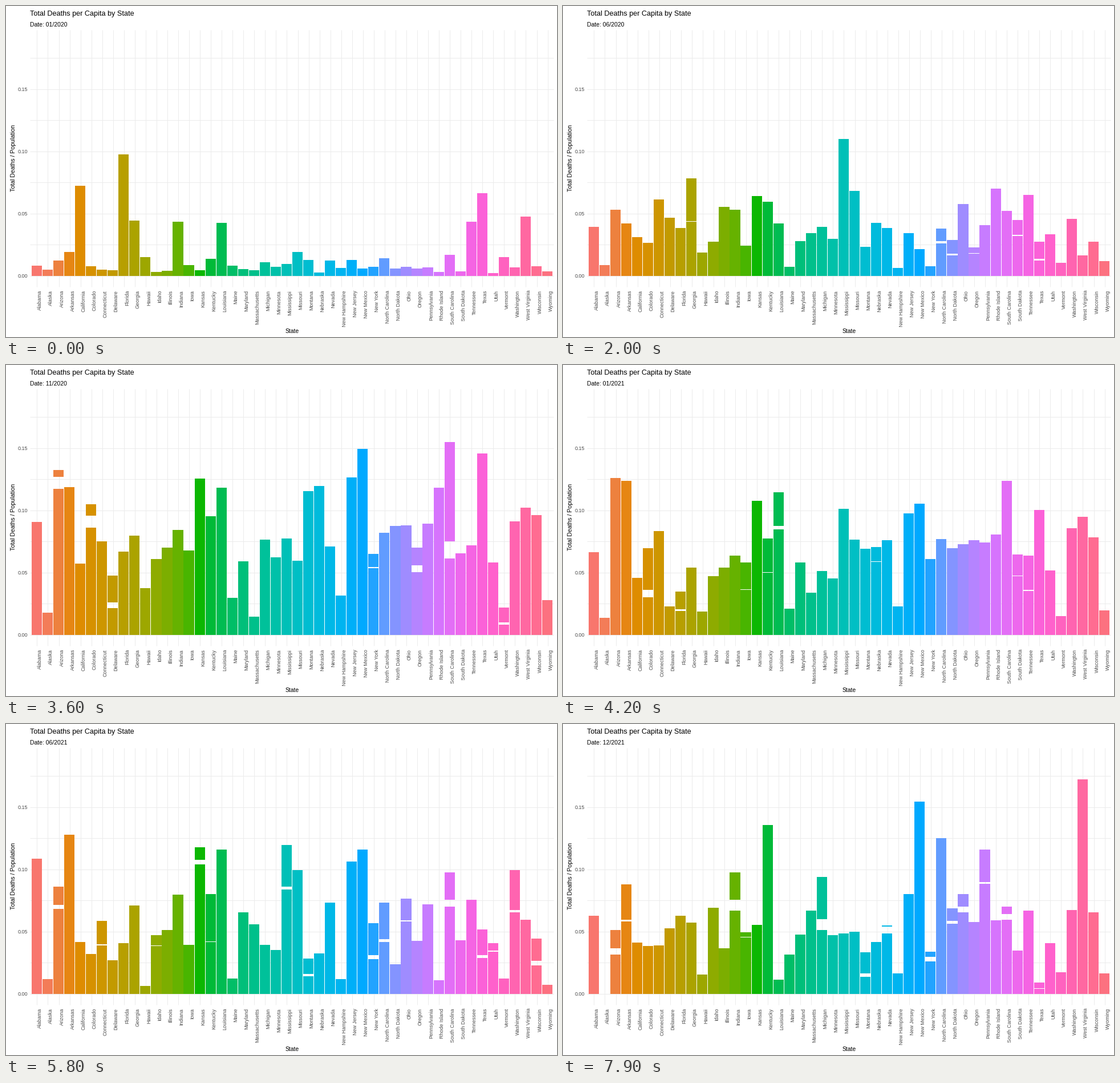
Animation, 966 px wide and 580 px high, one loop 8 s. Source, as a matplotlib script:

```python
import numpy as np
import matplotlib.pyplot as plt
from matplotlib.animation import FuncAnimation

W, H, FRAMES, STEP = 966, 580, 80, 100
LEFT, RIGHT, TOP, BOTTOM = 42, 960, 42, 492
ZERO, SCALE = 472, 2.182          # baseline row, pixels per 0.001
DAYS_PER_FRAME = 9

STATES = """Alabama,Alaska,Arizona,Arkansas,California,Colorado,Connecticut,Delaware,
Florida,Georgia,Hawaii,Idaho,Illinois,Indiana,Iowa,Kansas,Kentucky,Louisiana,Maine,
Maryland,Massachusetts,Michigan,Minnesota,Mississippi,Missouri,Montana,Nebraska,Nevada,
New Hampshire,New Jersey,New Mexico,New York,North Carolina,North Dakota,Ohio,Oregon,
Pennsylvania,Rhode Island,South Carolina,South Dakota,Tennessee,Texas,Utah,Vermont,
Washington,West Virginia,Wisconsin,Wyoming""".replace("\n", "").split(",")
N = len(STATES)

HARD_HIT = """Alabama,Arizona,Arkansas,Georgia,Indiana,Kansas,Kentucky,Louisiana,
Mississippi,Missouri,Nevada,New Jersey,New Mexico,North Carolina,Ohio,Pennsylvania,
South Carolina,Tennessee,Washington,West Virginia""".replace("\n", "").split(",")
SPARED = ["Alaska", "Hawaii", "Maine", "New Hampshire", "Vermont", "Wyoming"]
TIER = np.array([0 if s in HARD_HIT else 2 if s in SPARED else 1 for s in STATES])

# (time, typical height per tier, spread, outliers); heights in thousandths
POSES = [
    (0, (14, 7, 12), .7, {"California": 72, "Florida": 97, "Texas": 66, "Tennessee": 43,
                          "Louisiana": 42, "West Virginia": 47}),
    (12, (29, 22, 10), .4, {"Mississippi": 117, "Rhode Island": 78, "Delaware": 73,
                            "Connecticut": 71, "Illinois": 71}),
    (29, (74, 38, 7), .25, {"Mississippi": 110, "Missouri": 107, "Tennessee": 98,
                            "New York": 0, "New Mexico": 1, "West Virginia": 16}),
    (36, (90, 74, 25), .25, {"New Mexico": 149, "Arizona": 132, "Kansas": 125,
                             "Montana": 115, "Nebraska": 119, "Massachusetts": 14}),
    (49, (68, 36, 7), .25, {"Mississippi": 95, "Missouri": 88, "Nebraska": .5,
                            "Montana": 3, "Delaware": 1.4, "Connecticut": 77}),
    (66, (104, 46, 12), .25, {"Alabama": 164, "Louisiana": 147, "South Carolina": 134,
                              "North Dakota": 0, "Rhode Island": 1.4}),
    (79, (68, 50, 24), .3, {"West Virginia": 172, "New Mexico": 154, "Kentucky": 135,
                            "Louisiana": 11, "Texas": 8.5, "Alaska": 0}),
]


def pose_heights(levels, spread, outliers, rng):
    height = np.take(levels, TIER) * np.exp(rng.normal(0, spread, N))
    for name, value in outliers.items():
        height[STATES.index(name)] = value
    return np.minimum(height, 187)


def build_track(rng):
    """Knots of time, height, gap centre and gap width; gaps are shares of the height."""
    times = [p[0] for p in POSES]
    poses = [pose_heights(*p[1:], rng) for p in POSES]
    knots = [(times[0], poses[0])]
    for t0, t1, a, b in zip(times, times[1:], poses, poses[1:]):
        parts = round((t1 - t0) / 3.4)
        for u in np.arange(1, parts) / parts:
            mid = (a + (b - a) * u) * (1 + rng.normal(0, .15, N))
            knots.append((t0 + (t1 - t0) * u, np.clip(mid, 0, 187)))
        knots.append((t1, b))
    t, height = (np.array(col) for col in zip(*knots))
    centre = rng.uniform(.4, .95, height.shape)
    torn = rng.random(height.shape) < .004 * t[:, None]
    width = rng.uniform(.01, .12, height.shape) * torn
    return t, height, centre, width


TIMES, *TRACKS = build_track(np.random.default_rng(5))


def hcl(hue, chroma=100, lum=65):
    """Polar LUV to sRGB with a D65 white point."""
    white = np.array([.95047, 1, 1.08883])
    s = white @ [1, 15, 3]
    un, vn = 4 * white[0] / s, 9 * white[1] / s
    y = ((lum + 16) / 116) ** 3
    u = chroma * np.cos(np.radians(hue)) / (13 * lum) + un
    v = chroma * np.sin(np.radians(hue)) / (13 * lum) + vn
    x = 9 * y * u / (4 * v)
    z = -x / 3 - 5 * y + 3 * y / v
    rgb = np.array([[3.240479, -1.53715, -.498535],
                    [-.969256, 1.875992, .041556],
                    [.055648, -.204043, 1.057311]]) @ [x, y, z]
    rgb = np.clip(rgb, 0, 1)
    return np.where(rgb > .00304, 1.055 * rgb ** (1 / 2.4) - .055, 12.92 * rgb)


plt.rcParams["font.family"] = "Liberation Sans"
fig = plt.figure(figsize=(W / 100, H / 100), dpi=100, facecolor="white")
ax = fig.add_axes([0, 0, 1, 1])
ax.set(xlim=(0, W), ylim=(H, 0))
ax.axis("off")


def label(x, y, text, px, color="black", ha="left", angle=0):
    return ax.text(x, y, text, fontsize=px * .72, color=color, ha=ha, va="baseline",
                   rotation=angle, rotation_mode="anchor")


pitch = (RIGHT - LEFT) / (N + .2)
xs = LEFT + pitch * (.6 + np.arange(N))

grid = dict(colors="#EBEBEB", linewidth=.72, zorder=1)
rows = np.floor(ZERO - 25 * SCALE * np.arange(8) + .3) + .5
ax.hlines(rows, LEFT, RIGHT, **grid)
ax.vlines(np.round(xs) + .5, TOP, BOTTOM, **grid)

label(42, 16.5, "Total Deaths per Capita by State", 12.6)
date = label(42, 36, "", 10.4)
label(501.5, 573, "State", 10.4, ha="center")
label(15.7, 266.5, "Total Deaths / Population", 10.5, ha="center", angle=90)
for k in range(4):
    label(38, rows[2 * k] + 3.2, f"{k * .05:.2f}", 9, "#4D4D4D", "right")
for x, name in zip(xs, STATES):
    label(x + 9, 498, name, 8.9, "#4D4D4D", "right", 90)

lower, upper = [], []
for i, x in enumerate(xs):
    x0, x1 = round(x - .45 * pitch), round(x + .45 * pitch) + 1
    for group in (lower, upper):
        bar = plt.Rectangle((x0, ZERO), x1 - x0, 0, color=hcl(15 + 360 * i / N),
                            linewidth=0, antialiased=False, zorder=2)
        group.append(ax.add_patch(bar))


def span(bar, bottom, top):
    y0, y1 = (round(ZERO - v * SCALE) for v in (bottom, top))
    bar.set_y(y1)
    bar.set_height(y0 - y1 + 1)
    bar.set_visible(y0 > y1)


def update(frame):
    k = min(np.searchsorted(TIMES, frame, side="right") - 1, len(TIMES) - 2)
    u = (frame - TIMES[k]) / (TIMES[k + 1] - TIMES[k])
    height, centre, width = (a[k] + (a[k + 1] - a[k]) * u for a in TRACKS)
    for i, top in enumerate(height):
        mid, half = top * centre[i], top * width[i] / 2
        half = min(half, top - mid)
        broken = 2 * half * SCALE > 1
        span(lower[i], 0, mid - half if broken else top)
        span(upper[i], mid + half if broken else top, top)
    day = np.datetime64("2020-01-01") + frame * DAYS_PER_FRAME
    year, month = str(day).split("-")[:2]
    date.set_text(f"Date: {month}/{year}")
    return lower + upper + [date]


anim = FuncAnimation(fig, update, frames=FRAMES, interval=STEP, repeat=True,
                     repeat_delay=0, blit=False)
plt.show()
```
